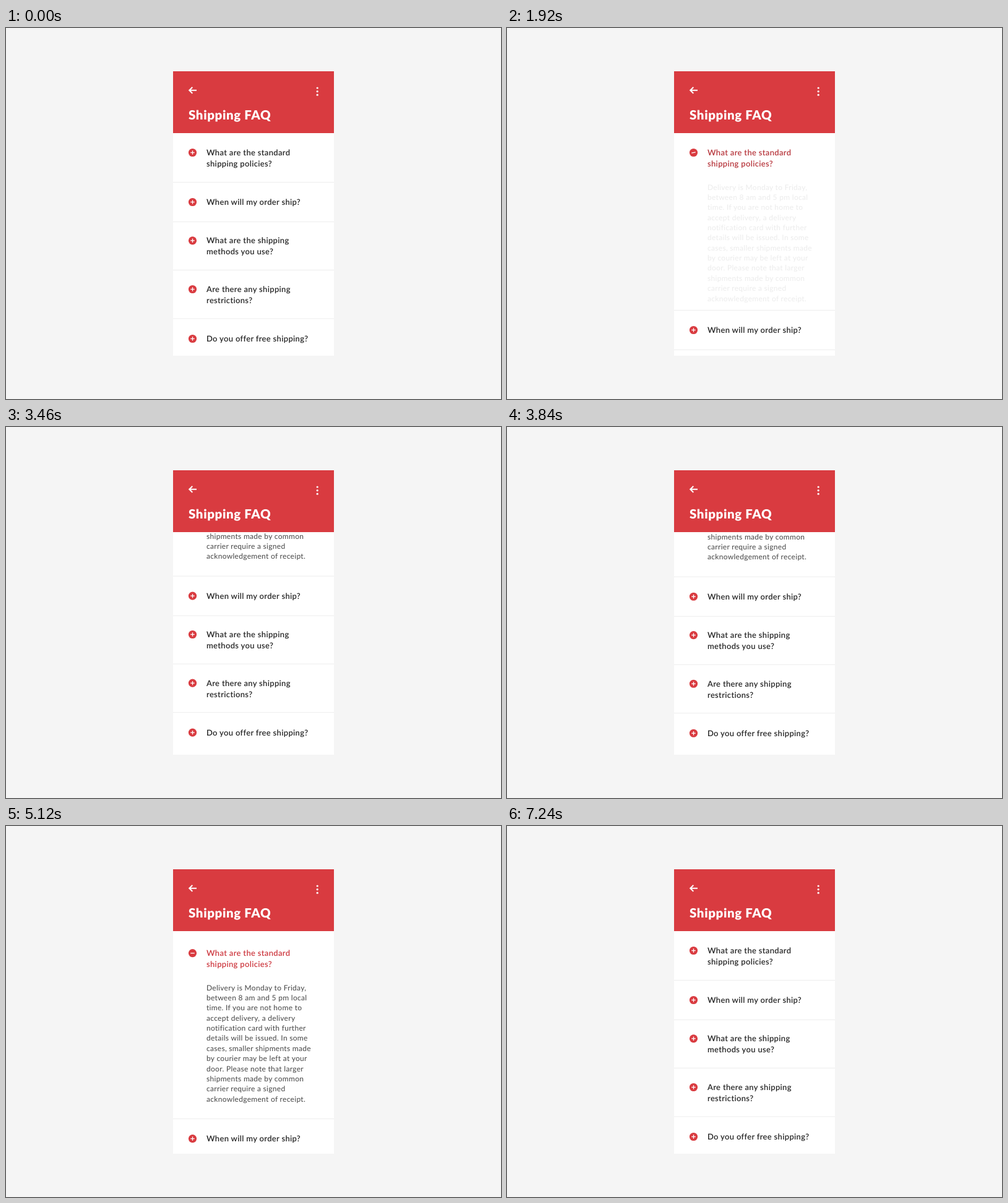
Recreate the animation shown at these times as an HTML page. Size 800 px wide and 600 px high, loop 8100 ms.

```html
<!DOCTYPE html>
<html lang="en">
<head>
<meta charset="utf-8">
<title>Shipping FAQ</title>
<style>
  html, body { margin: 0; width: 100%; height: 100%; overflow: hidden; background: #f5f5f5; }
  svg { display: block; width: 100vw; height: 100vh; }
  text { font-family: Lato, "Open Sans", sans-serif; text-rendering: geometricPrecision; }
  .title { font-size: 20.5px; font-weight: 900; letter-spacing: .6px; fill: #fff; }
  .question { font-size: 13px; font-weight: 600; letter-spacing: .32px; fill: #262626; }
  .answer { font-size: 12px; letter-spacing: .3px; fill: #464646; }
</style>
</head>
<body>
<svg viewBox="0 0 800 600">
  <defs><clipPath id="card"><rect x="270" y="70" width="260" height="460"/></clipPath></defs>
  <rect width="800" height="600" fill="#f5f5f5"/>
  <g clip-path="url(#card)">
    <rect x="270" y="70" width="260" height="460" fill="#fff"/>
    <g id="list">
      <g id="answer"></g>
      <g id="first"></g>
      <g id="rest"><rect x="270" y="249.5" width="260" height="400" fill="#fff"/></g>
    </g>
    <rect x="270" y="70" width="260" height="100" fill="#d93b40"/>
    <path d="M308 100.8H296.5M301.3 95.8L296.2 100.8L301.3 105.8" fill="none" stroke="#fff" stroke-width="2"/>
    <g fill="#fff">
      <circle cx="503.2" cy="97" r="1.6"/>
      <circle cx="503.2" cy="102.6" r="1.6"/>
      <circle cx="503.2" cy="108.2" r="1.6"/>
    </g>
    <text class="title" x="295" y="147.5">Shipping FAQ</text>
  </g>
</svg>
<script>
const LOOP = 8100;
const GROW = 220;     // height added by the open answer
const SCROLL = 224.2; // distance to the end of the list
const BOUNCE = 4.5;

const RED = [205, 57, 64];
const DARK = [38, 38, 38];

const items = [
  { y: 201.5, lines: ["What are the standard", "shipping policies?"] },
  { y: 281.5, rule: 249.5, lines: ["When will my order ship?"] },
  { y: 343.8, rule: 313.5, lines: ["What are the shipping", "methods you use?"] },
  { y: 422.5, rule: 391.5, lines: ["Are there any shipping", "restrictions?"] },
  { y: 502.5, rule: 470, lines: ["Do you offer free shipping?"] }
];

const answerLines = [
  "Delivery is Monday to Friday,",
  "between 8 am and 5 pm local",
  "time. If you are not home to",
  "accept delivery, a delivery",
  "notification card with further",
  "details will be issued. In some",
  "cases, smaller shipments made",
  "by courier may be left at your",
  "door. Please note that larger",
  "shipments made by common",
  "carrier require a signed",
  "acknowledgement of receipt."
];

const $ = id => document.getElementById(id);

function add(parent, tag, attrs, text) {
  const el = document.createElementNS("http://www.w3.org/2000/svg", tag);
  for (const key in attrs) el.setAttribute(key, attrs[key]);
  if (text) el.textContent = text;
  parent.appendChild(el);
  return el;
}

function addItem(parent, { y, rule, lines }) {
  if (rule) add(parent, "path", { d: `M270 ${rule}H530`, stroke: "#ededed" });
  const icon = add(parent, "g", { transform: `translate(301.5 ${y})` });
  add(icon, "circle", { r: 6.6, fill: "#d93b40" });
  const sign = add(icon, "g", { stroke: "#fff", "stroke-width": 1.3 });
  add(sign, "path", { d: "M-3.2 0H3.2" });
  const down = add(sign, "path", { d: "M0 -3.2V3.2" });
  const texts = lines.map((line, i) =>
    add(parent, "text", { class: "question", x: 324, y: y + 4.6 + i * 17.9 }, line));
  return { sign, down, texts };
}

const first = addItem($("first"), items[0]);
items.slice(1).forEach(item => addItem($("rest"), item));
answerLines.forEach((line, i) =>
  add($("answer"), "text", { class: "answer", x: 324, y: 261.5 + i * 16.37 }, line));

const clamp = v => Math.min(1, Math.max(0, v));
const span = (t, start, length) => clamp((t - start) / length);
const sine = p => (1 - Math.cos(Math.PI * p)) / 2;

// cubic-bezier(.4, 0, .2, 1), solved by bisection
function ease(x) {
  let lo = 0, hi = 1;
  for (let i = 0; i < 24; i++) {
    const s = (lo + hi) / 2, r = 1 - s;
    if (1.2 * r * r * s + 0.6 * r * s * s + s ** 3 < x) lo = s; else hi = s;
  }
  return lo * lo * (3 - 2 * lo);
}

// Fling past the end of the list, then settle back
const fling = (t, start) =>
  ease(span(t, start, 488)) * (SCROLL + BOUNCE) - BOUNCE * sine(span(t, start + 488, 912));

function render(t) {
  const open = ease(span(t, 1660, 370)) - ease(span(t, 6720, 480));
  const tint = span(t, 1660, 300) - span(t, 6720, 300);
  const turn = ease(span(t, 1660, 370)) - ease(span(t, 6720, 400));
  const fade = span(t, 1860, 600) - span(t, 6720, 200);
  const scroll = fling(t, 3000) - fling(t, 4660);

  $("list").setAttribute("transform", `translate(0 ${-scroll})`);
  $("rest").setAttribute("transform", `translate(0 ${GROW * open})`);
  $("answer").setAttribute("opacity", fade);

  const mix = DARK.map((c, i) => Math.round(c + (RED[i] - c) * tint));
  first.texts.forEach(el => { el.style.fill = `rgb(${mix})`; });
  first.sign.setAttribute("transform", `rotate(${180 * turn})`);
  first.down.setAttribute("transform", `scale(1 ${1 - turn})`);
}

function tick() {
  render(performance.now() % LOOP);
  requestAnimationFrame(tick);
}
tick();
</script>
</body>
</html>
```
